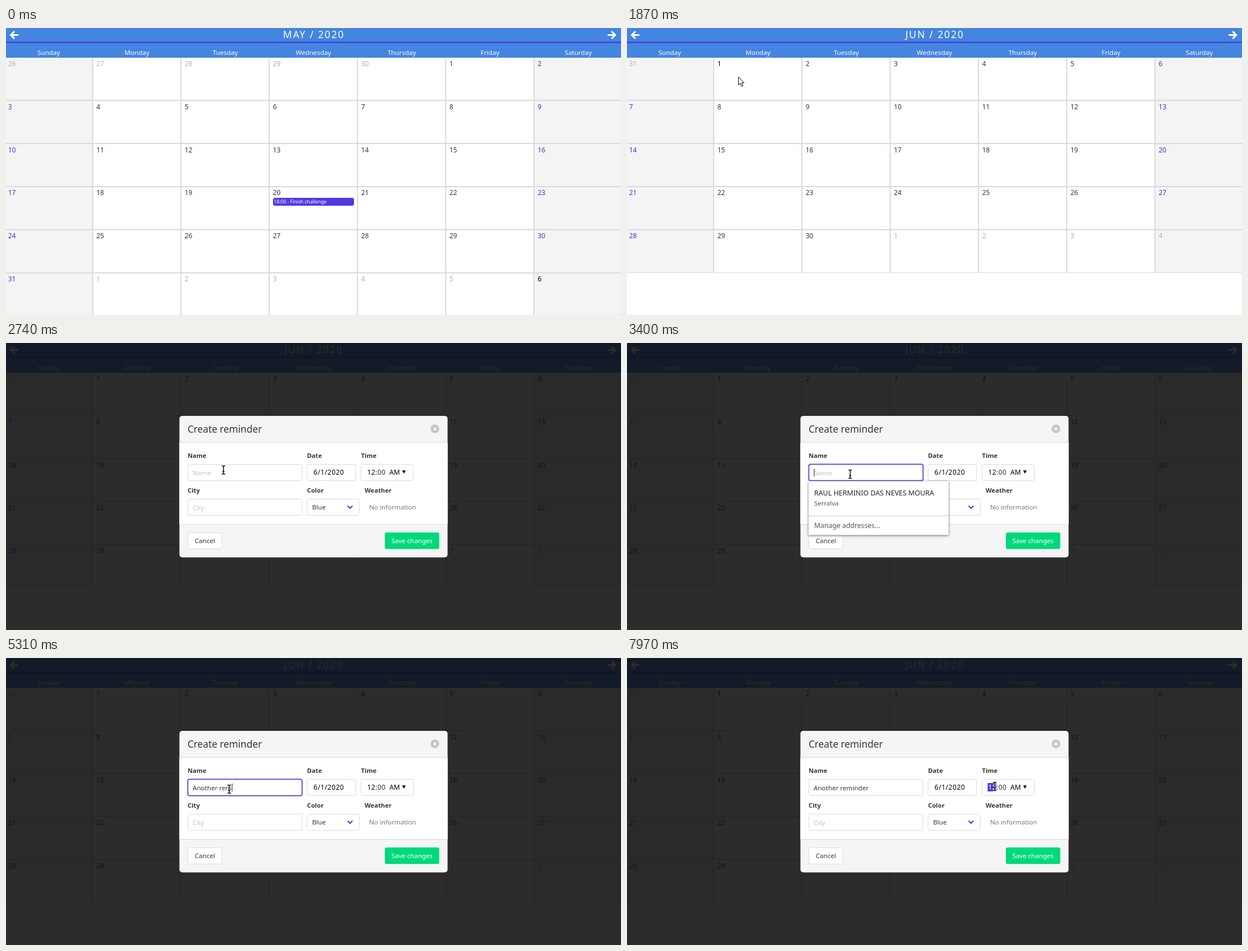
Animation of 1094 by 512 pixels, one loop 8 s. Source, as an HTML page:

```html
<!DOCTYPE html>
<html lang="en">
<head>
<meta charset="utf-8">
<title>Calendar reminder</title>
<style>
html, body { margin: 0; width: 100%; height: 100%; overflow: hidden; background: #fff; }
svg { display: block; width: 100vw; height: 100vh; }
text { font-family: "Noto Sans", "Open Sans", sans-serif; white-space: pre; }
.hover { fill: #000; font-weight: 500; }
</style>
</head>
<body>
<svg id="stage" viewBox="0 0 1094 512"></svg>
<script>
const LOOP = 8000, BLUE = '#4485df', VIOLET = '#4a2fdd', INK = '#363636', LINE = '#d9d9d9';
const DAYS = ['Sunday', 'Monday', 'Tuesday', 'Wednesday', 'Thursday', 'Friday', 'Saturday'];
const stage = document.getElementById('stage');

const text = (x, y, s, size = 11.6, fill = INK, attrs = '') =>
  `<text x="${x}" y="${y}" font-size="${size}" fill="${fill}" ${attrs}>${s}</text>`;
const rect = (x, y, w, h, fill, attrs = '') =>
  `<rect x="${x}" y="${y}" width="${w}" height="${h}" fill="${fill}" ${attrs}/>`;
const path = (d, attrs) => `<path d="${d}" ${attrs}/>`;
const label = (x, y, s) => text(x, y, s, 11.2, INK, 'font-weight="700"');
const box = (x, y, w, h = 29) => rect(x, y, w, h, '#fff', 'stroke="#dbdbdb" rx="3"');
const middle = 'text-anchor="middle"';

function month(id, title, lead, before, length, rows) {
  const bottom = rows === 6 ? 512 : 436;
  let out = rect(0, 53, 154, bottom - 53, '#f4f4f4') + rect(940, 53, 154, bottom - 53, '#f4f4f4');
  for (let c = 0; c < 6; c++) out += rect(153.2 + 157 * c, 53, 2, bottom - 53, LINE);
  for (let r = 0; r < 5; r++)
    out += rect(0, 128.2 + 76.9 * r, 1094, r === rows - 1 ? 1 : 2, LINE);
  for (let i = 0; i < rows * 7; i++) {
    const col = i % 7, row = Math.floor(i / 7), n = i - lead + 1;
    const outside = n < 1 || n > length;
    const day = n < 1 ? n + before : n > length ? n - length : n;
    const color = outside ? '#b0b0b0' : col % 6 ? INK : VIOLET;
    out += text(3.7 + 157 * col, 68 + 76.8 * row, day, 12, color, `id="${id}${i}"`);
  }
  out += text(547.5, 18, title, 17.5, '#fff', `${middle} letter-spacing="1.8"`);
  return `<g id="${id}">${out}</g>`;
}

const arrow = path('M15 6L8.7 12.5L15 19M9 12.5H22', 'fill="none" stroke="#fff" stroke-width="3.2"');
const header = rect(0, 0, 1094, 53, BLUE) + rect(0, 24.6, 1094, 2, VIOLET) + arrow +
  `<g transform="translate(1092.3)scale(-1 1)">${arrow}</g>` +
  DAYS.map((d, i) => text(76 + 157 * i, 48, d, 11.6, '#fff', middle)).join('');

const reminder = rect(475, 303, 144, 14, '#5039df', 'rx="3.5"') +
  text(476.5, 313, '18:00 - Finish challenge', 8.55, '#fff');

const modal = rect(0, 0, 1094, 512, '#0a0a0a', 'opacity=".86"') +
  rect(308.5, 130, 477, 252.5, '#f5f5f5', 'rx="5"') +
  rect(308.5, 177, 477, 147, '#dbdbdb') + rect(308.5, 178, 477, 145, '#fff') +
  text(323, 159.5, 'Create reminder', 17.2) +
  '<circle cx="763" cy="153.2" r="7.6" fill="#c4c4c4"/>' +
  path('M760.4 150.6l5.2 5.2m0-5.2l-5.2 5.2', 'stroke="#fff" stroke-width="1.7"') +
  label(323, 205, 'Name') + label(535.5, 205, 'Date') + label(631.5, 205, 'Time') +
  label(323, 267, 'City') + label(535.5, 267, 'Color') + label(638, 267, 'Weather') +
  box(323.5, 216.5, 203) + box(535.5, 216.5, 86.5) + box(631.5, 216.5, 93) +
  box(323.5, 278.5, 203) + box(535.5, 278.5, 93) +
  text(547, 235, '6/1/2020', 12, '#000', 'letter-spacing=".55"') +
  text(657, 235, ':00', 12, '#333', 'letter-spacing=".5"') +
  text(682, 235, 'AM', 12, '#000') +
  path('M704.6 227.2h6.4l-3.2 6z', 'fill="#111"') +
  text(332, 297.5, 'City', 11.6, '#c4c4c4') + text(544.5, 297, 'Blue') +
  path('M607.6 290.4l4.4 4.4l4.4-4.4', `fill="none" stroke="${VIOLET}" stroke-width="2"`) +
  text(646, 297, 'No information', 11.6, '#777') +
  box(323.5, 338.5, 60.5) + text(353.7, 357, 'Cancel', 11.6, INK, middle) +
  rect(674, 338, 96.7, 29.5, '#00d97b', 'rx="3"') +
  text(722.2, 357, 'Save changes', 11.5, '#fff', middle) +
  `<g id="focus">${rect(322.5, 215.5, 205, 31, 'none', 'stroke="#5138dd" stroke-opacity=".25" stroke-width="2" rx="4"')}` +
  rect(323.5, 216.5, 203, 29, 'none', 'stroke="#5138dd" stroke-width="1.5" rx="3"') + '</g>' +
  text(332, 235.5, 'Name', 11.6, '#c4c4c4', 'id="hint"') +
  text(332, 235.5, '', 11.6, INK, 'id="field"') +
  rect(332.5, 224, 1, 14, '#222', 'id="caret"') +
  rect(641.5, 223, 15.5, 15, '#5138dd', 'id="picked"') +
  text(642.5, 235, '12', 12, '#000', 'id="hour" letter-spacing=".3"');

const suggestions = rect(323, 246.5, 249, 96, '#fff', 'style="filter:drop-shadow(0 1px 2px #0009)"') +
  text(333, 272, 'RAUL HERMINIO DAS NEVES MOURA', 12.4, '#222') +
  text(333, 290, 'Serralva', 11.4, '#555') + rect(323, 308, 249, 1, '#ccc') +
  text(333, 330, 'Manage addresses…', 12.2, '#555');

const outline = 'fill="#fff" stroke="#000" stroke-linejoin="round"';
const beam = 'M-3-7.5Q0-7.5 0-5.5Q0-7.5 3-7.5M0-6V6M-3 7.5Q0 7.5 0 5.5Q0 7.5 3 7.5M-1.7 2.5H1.7';
const pointers = {
  plain: path('M.5.5V14.5L3.7 11.6L6 17L8.4 16L6.1 10.8H10.3Z', outline),
  hand: path('M-1.6 7V1Q-1.6-.5-.2-.5Q1.2-.5 1.2 1V5Q3.2 4 4 5.6Q6 5 6.6 6.4Q9 6.2 9 8.2V11L7.6 14.5H.4L-4.6 9Q-5.6 7.2-4 6.9Q-3 6.7-1.6 8.5ZM1.2 5V8M4 6V8.5M6.6 6.6V9', outline),
  beam: path(beam, 'fill="none" stroke="#fff" stroke-width="3"') +
    path(beam, 'fill="none" stroke="#000" stroke-width="1.4"')
};

stage.innerHTML = header + month('may', 'MAY / 2020', 5, 30, 31, 6) +
  month('jun', 'JUN / 2020', 1, 31, 30, 5) + `<g id="event">${reminder}</g>` +
  `<g id="modal">${modal}<g id="menu">${suggestions}</g></g><g id="pointer">` +
  Object.entries(pointers).map(([k, v]) => `<g id="${k}">${v}</g>`).join('') + '</g>';

const el = id => document.getElementById(id);
const show = (id, on) => el(id).setAttribute('visibility', on ? 'inherit' : 'hidden');

const NEXT = 1100, OPEN = 2070, FOCUS = 2930, MENU = 3040, LEAVE = 7100;
const NAME = 'Another reminder';
const keyTime = i => i < 2 ? 3560 + 340 * i : i < 11 ? 4600 + 80 * (i - 2) : 5430 + 110 * (i - 11);

// Pointer stops: time, x, y
const route = [
  [0, 1093, 511], [30, 1093, 511], [780, 1074, 3], [1150, 1074, 3],
  [1850, 198, 87], [2100, 198, 87], [2850, 397, 234],
  [6240, 397, 234], [7000, 654, 229], [LOOP, 654, 229]
];

function pointerAt(t) {
  const i = route.findIndex(p => p[0] > t);
  const [t0, x0, y0] = route[i - 1], [t1, x1, y1] = route[i];
  const k = (1 - Math.cos(Math.PI * (t - t0) / (t1 - t0))) / 2;
  return [x0 + (x1 - x0) * k, y0 + (y1 - y0) * k];
}

function pointerKind(x, y, open) {
  if (!open) return y < 24 && x > 1066 ? 'hand' : 'plain';
  const inField = y > 216 && y < 246 &&
    (x > 323 && x < 527 || x > 535 && x < 622 || x > 631 && x < 700);
  return inField ? 'beam' : 'plain';
}

function draw(now) {
  const t = now % LOOP, open = t >= OPEN, id = t < NEXT ? 'may' : 'jun';
  show('may', id === 'may');
  show('event', id === 'may');
  show('jun', id === 'jun');
  show('modal', open);

  const [x, y] = pointerAt(t), kind = pointerKind(x, y, open);
  el('pointer').setAttribute('transform', `translate(${x} ${y})`);
  for (const k in pointers) show(k, k === kind);

  document.querySelector('.hover')?.classList.remove('hover');
  if (!open && y > 53)
    el(id + (Math.floor((y - 53) / 76.8) * 7 + Math.floor((x + 3) / 157)))?.classList.add('hover');

  let typed = 0;
  while (typed < NAME.length && keyTime(typed) <= t) typed++;
  const focused = open && t >= FOCUS && t < LEAVE;
  const since = t - (typed ? keyTime(typed - 1) : FOCUS);
  el('field').textContent = NAME.slice(0, typed);
  el('caret').setAttribute('x', 332.5 + (typed ? el('field').getComputedTextLength() : 0));
  show('hint', open && !typed);
  show('focus', focused);
  show('caret', focused && since % 1000 < 500);
  show('menu', open && t >= MENU && !typed);

  const picked = t >= LEAVE;
  show('picked', picked);
  el('hour').setAttribute('fill', picked ? '#fff' : '#000');
}

function tick(now) {
  draw(now);
  requestAnimationFrame(tick);
}
draw(0);
requestAnimationFrame(tick);
</script>
</body>
</html>
```
